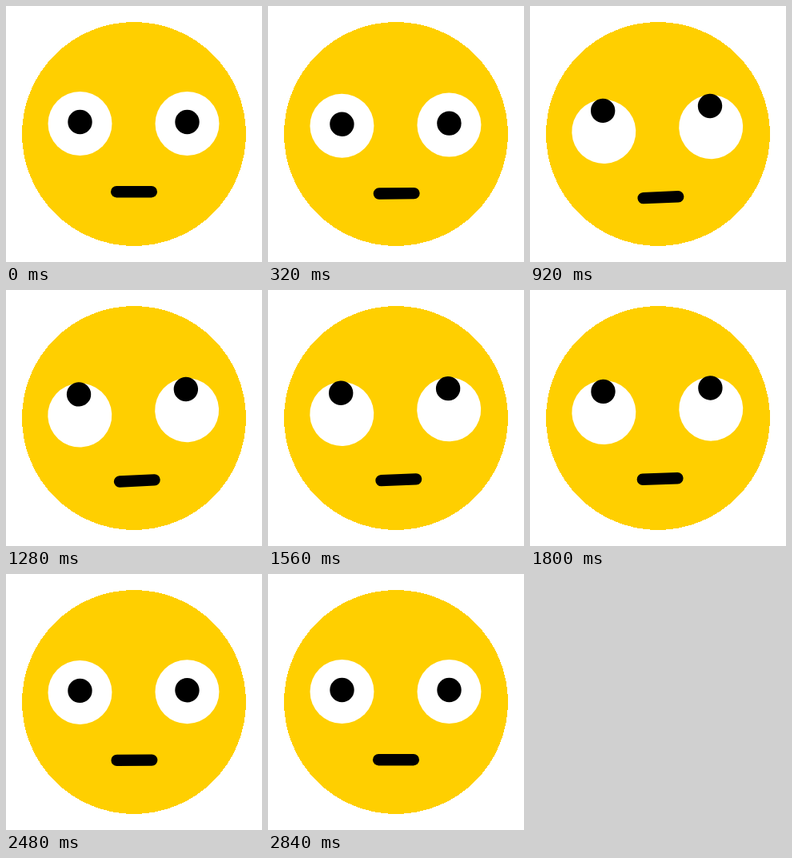
These frames come from a looping animation (320x320 px, 2880 ms). An HTML page:

```html
<!DOCTYPE html>
<html lang="en">
<head>
<meta charset="utf-8">
<title>Rolling eyes</title>
<style>
  html, body { margin: 0; width: 100%; height: 100%; overflow: hidden; background: #fff; }
  svg { display: block; width: 100vw; height: 100vh; }
</style>
</head>
<body>
<svg viewBox="0 0 320 320">
  <circle cx="160" cy="160" r="140" fill="#ffcf00" shape-rendering="crispEdges"/>
  <g id="features">
    <g fill="#fff">
      <circle cx="92.5" cy="147" r="40"/>
      <circle cx="226.5" cy="147" r="40"/>
    </g>
    <g id="pupils">
      <circle cx="92.5" cy="145" r="15.2"/>
      <circle cx="226.5" cy="145" r="15.2"/>
    </g>
    <rect x="131" y="225" width="58" height="14.4" rx="7.2"/>
  </g>
</svg>
<script>
  const LOOP = 2880, STEP = 40;
  const features = document.getElementById('features');
  const pupils = document.getElementById('pupils');

  // Sine ease from 0 to 1 between times a and b
  function ease(t, a, b) {
    const u = Math.min(1, Math.max(0, (t - a) / (b - a)));
    return (1 - Math.cos(Math.PI * u)) / 2;
  }

  // Rise from 0 to 1 until the peak, then settle back by the end
  function swell(t, peak, end) {
    return t < peak ? ease(t, 0, peak) : 1 - ease(t, peak, end);
  }

  function draw(t) {
    const drop = 7.1 * swell(t, 860, 2840);
    const tilt = -2.77 * swell(t, 1160, 2840);
    const look = -24.2 * (ease(t, 340, 620) - ease(t, 2020, 2420));
    features.setAttribute('transform', `translate(0 ${drop}) rotate(${tilt} 160 153)`);
    pupils.setAttribute('transform', `translate(0 ${look})`);
  }

  const start = performance.now();
  function tick() {
    const t = (performance.now() - start) % LOOP;
    draw(Math.floor(t / STEP) * STEP);
    requestAnimationFrame(tick);
  }
  tick();
</script>
</body>
</html>
```
